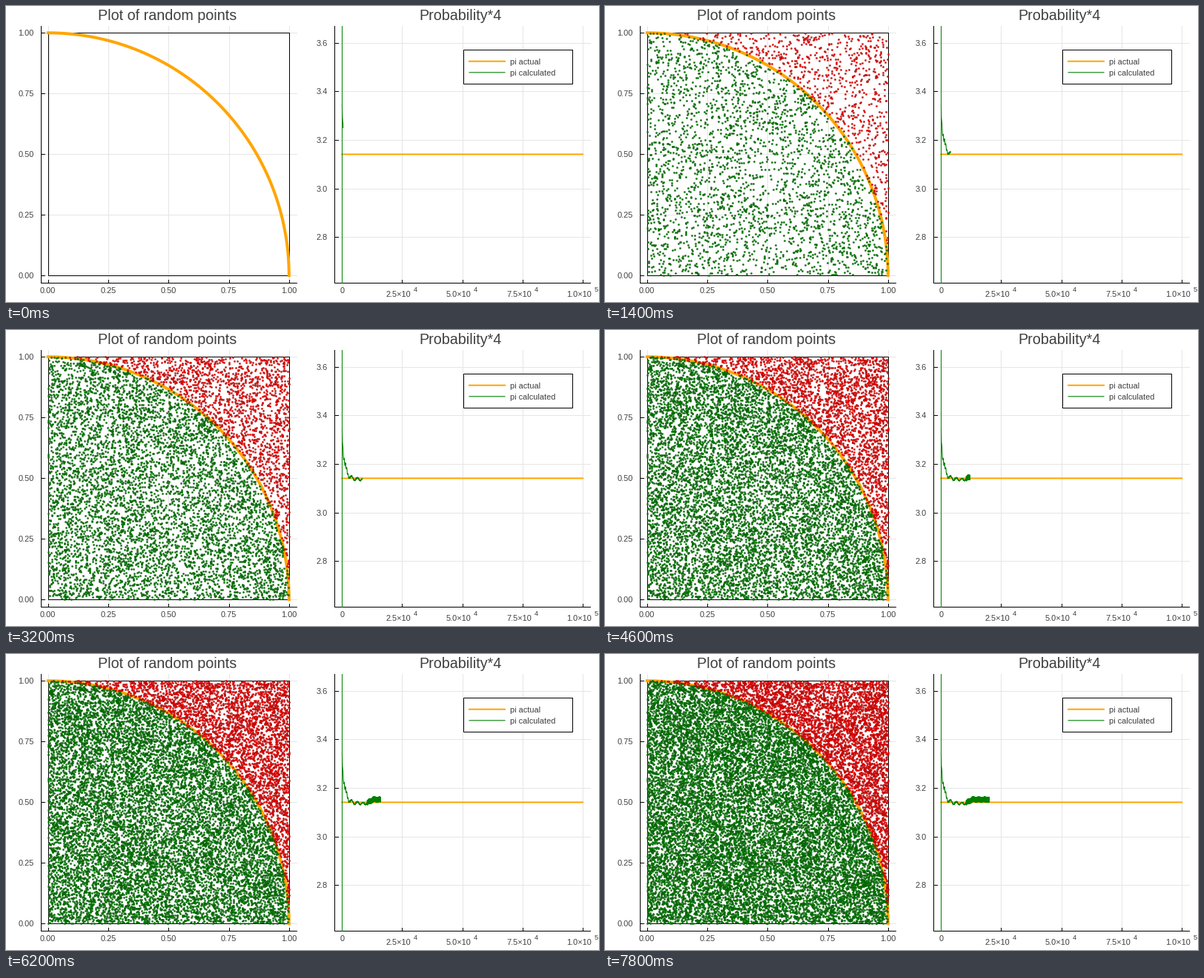
Animation of 800x400 px, one loop 8 s. Source, as a matplotlib script:

```python
import numpy as np
import matplotlib.pyplot as plt
from matplotlib.animation import FuncAnimation
from matplotlib.patches import Rectangle

FRAMES, STEP = 40, 500
PX = 0.72  # points per pixel at 100 dpi
ORANGE, GREEN, RED, INK = "#ffa500", "#008000", "#ff0000", "#404040"
TOP, BOTTOM = 27, 374

fig = plt.figure(figsize=(8, 4), dpi=100, facecolor="white")
ax = fig.add_axes([0, 0, 1, 1])
ax.set_xlim(0, 800)
ax.set_ylim(400, 0)
ax.axis("off")


def line(xs, ys, color="black", width=1.0, z=2, **kw):
    return ax.plot(xs, ys, color=color, lw=width * PX, zorder=z, **kw)[0]


def label(x, y, text, size=11, ha="center"):
    ax.text(x, y, text, fontsize=size * PX, color=INK, ha=ha,
            va="baseline", family="Liberation Sans", zorder=9)


def panel(x0, x1, xticks, yticks, ylabels, title):
    for x in xticks:
        line([x, x], [TOP, BOTTOM], "#e5e5e5", z=0)
        line([x, x], [BOTTOM - 4, BOTTOM])
    for y, text in zip(yticks, ylabels):
        line([x0, x1], [y, y], "#e5e5e5", z=0)
        line([x0, x0 + 5], [y, y])
        label(x0 - 9, y + 4, text, ha="right")
    line([x0, x0], [TOP, BOTTOM])
    line([x0, x1], [BOTTOM, BOTTOM])
    label((x0 + x1) / 2 - 2, 19, title, 19.8)


# Left panel: unit square with a quarter circle
LEFT, HIGH, WIDE, TALL = 56.8, 36.3, 325, 327.9
LOW = HIGH + TALL
quarters = np.linspace(0, 1, 5)
names = [f"{q:.2f}" for q in quarters]
left_ticks = LEFT + WIDE * quarters
panel(47, 392, left_ticks, LOW - TALL * quarters, names,
      "Plot of random points")
for x, name in zip(left_ticks, names):
    label(x, 388, name)
ax.add_patch(Rectangle((LEFT, HIGH), WIDE, TALL, fill=False, lw=PX, zorder=3))
angle = np.linspace(0, np.pi / 2, 120)
line(LEFT + WIDE * np.cos(angle), LOW - TALL * np.sin(angle), ORANGE, 4, 4)

# Right panel: running estimate of pi
ZERO, SPAN, PI_Y = 453.2, 325, 200.4
values = np.arange(2.8, 3.7, 0.2)
right_ticks = ZERO + SPAN * quarters
panel(443, 788, right_ticks, 246.6 - 328 * (values - 3),
      [f"{v:.1f}" for v in values], "Probability*4")
label(ZERO, 388, "0")
for x, mantissa, power in zip(right_ticks[1:], ("2.5", "5.0", "7.5", "1.0"),
                              "4445"):
    label(x - 21.7, 393, mantissa + "×10", ha="left")
    label(x + 18, 386, power, 9.5)
line([ZERO, ZERO], [TOP, BOTTOM], GREEN, 1, 5)
line([ZERO, ZERO + SPAN], [PI_Y, PI_Y], ORANGE, 2, 4, snap=False)

ax.add_patch(Rectangle((617, 59), 147, 46, fc="white", ec="black",
                       lw=PX, zorder=7))
for y, color, width, text in [(74.7, ORANGE, 2, "pi actual"),
                              (89.8, GREEN, 1.1, "pi calculated")]:
    line([625, 673], [y, y], color, width, 8, snap=False)
    label(680, y + 4.2, text, ha="left")

# Random points, in order of appearance
rng = np.random.default_rng(7)
pts = rng.random((FRAMES * STEP, 2))
inside = np.hypot(pts[:, 0], pts[:, 1]) < 1
px = LEFT + WIDE * pts[:, 0]
py = LOW - TALL * pts[:, 1]

# Estimate trace: a noisy decay towards pi, then a dense oscillating band
u = np.arange(0.25, SPAN * FRAMES * STEP / 1e5 + 0.05, 0.125)
decay = 55 * np.exp(-u / 4) + 6 / (u + 0.03)
wobble = 4 * np.exp(-u / 25) * np.sin(0.83 * u)
ripple = 5 * np.exp(-u / 6) * np.sin(3.6 * u)
rise = 5.5 * np.clip((u - 33) / 9, 0, 1)
flip = (-1) ** np.arange(u.size)
swing = flip * (2.4 + 1.3 * rng.random(u.size))
jitter = np.where(u > 34, swing, rng.normal(0, 0.5, u.size))
tx = ZERO + u
ty = 202.3 - decay + wobble + ripple - rise + jitter


def dots(color, edge):
    return ax.plot([], [], "o", ms=2.4 * PX, mfc=color, mec=edge,
                   mew=0.4 * PX, zorder=5)[0]


green_dots = dots(GREEN, (0, 0.2, 0, 0.6))
red_dots = dots(RED, (0.35, 0, 0, 0.6))
trace = line([], [], GREEN, 1.1, 5)
trace.set_clip_path(Rectangle((443, TOP), 345, BOTTOM - TOP,
                              transform=ax.transData))


def update(k):
    n = STEP * k
    hit = inside[:n]
    green_dots.set_data(px[:n][hit], py[:n][hit])
    red_dots.set_data(px[:n][~hit], py[:n][~hit])
    seen = u <= SPAN * STEP * (k + 1) / 1e5
    trace.set_data(tx[seen], ty[seen])
    return green_dots, red_dots, trace


anim = FuncAnimation(fig, update, frames=FRAMES, interval=200,
                     repeat=True, repeat_delay=0, blit=False)
plt.show()
```
